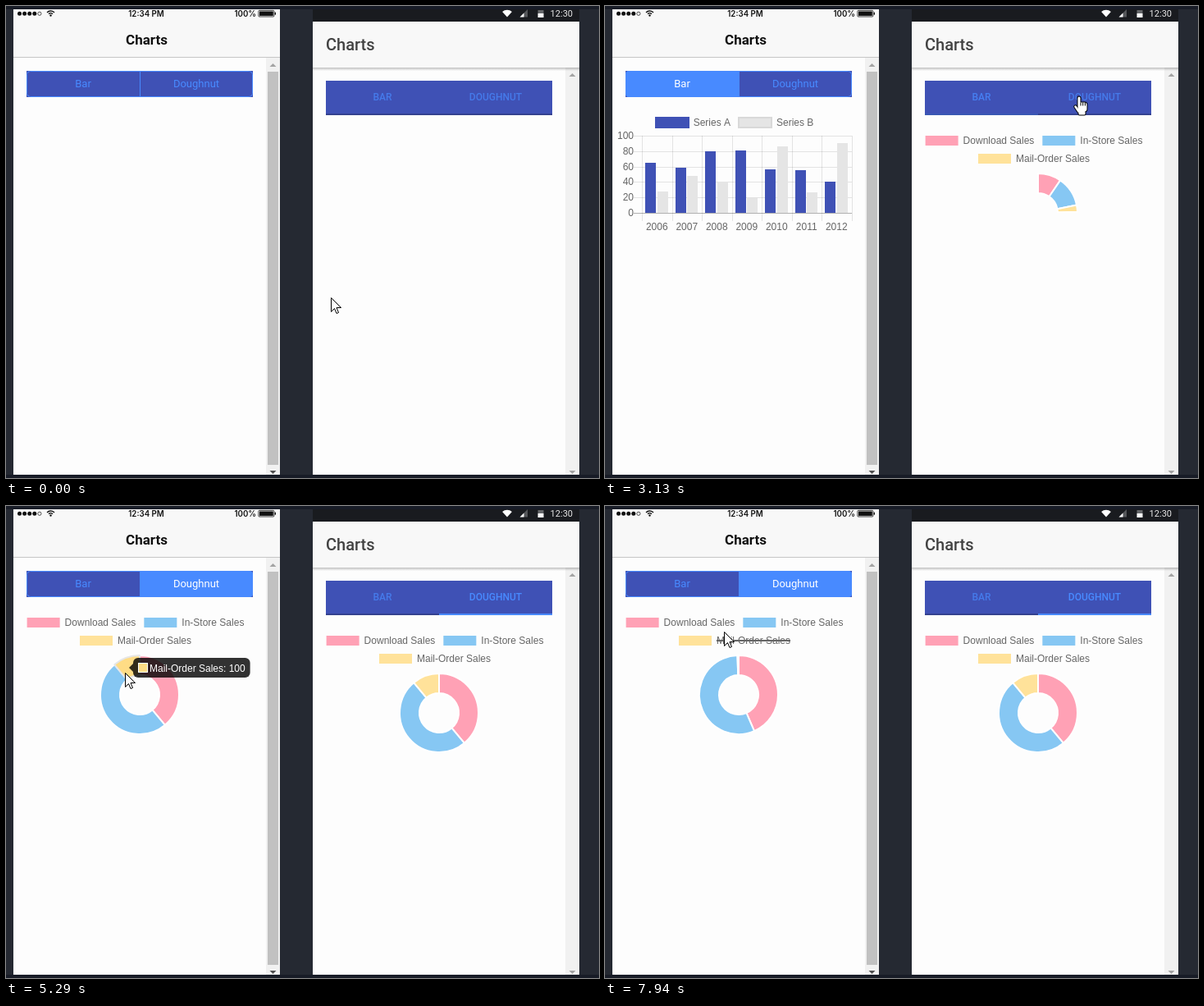
Recreate the animation shown at these times as an HTML page with a canvas. Size 723x575 px, loop 8 s.

```html
<!DOCTYPE html>
<html lang="en">
<head>
<meta charset="utf-8">
<title>Charts</title>
<style>
  html, body { margin: 0; width: 100%; height: 100%; overflow: hidden; background: #252932; }
  canvas { display: block; }
</style>
</head>
<body>
<canvas id="stage" width="723" height="575"></canvas>
<script>
const ctx = document.getElementById('stage').getContext('2d');
const LOOP = 8000;
const NAVY = '#3f51b5', BLUE = '#488aff', GREY = '#666', SILVER = '#e5e5e5';
const ARIAL = '12px "Liberation Sans", Arial, sans-serif';
const roboto = (size, weight = 400) => `${weight} ${size}px Roboto, sans-serif`;

const SERIES = [
  { name: 'Series A', color: NAVY, edge: NAVY, data: [65, 59, 80, 81, 56, 55, 40] },
  { name: 'Series B', color: SILVER, edge: '#d9d9d9', data: [28, 48, 40, 19, 86, 27, 90] }
];
const SLICES = [
  { name: 'Download Sales', value: 350, color: '#ffa1b5', hover: '#ff8ca4' },
  { name: 'In-Store Sales', value: 450, color: '#86c7f3', hover: '#69c3ff' },
  { name: 'Mail-Order Sales', value: 100, color: '#ffe29a', hover: '#ffdc85' }
];
const RING = { x: 163, y: 230, outer: 48, inner: 24 };

// Each phone: chart offset, segment control, and click times
const IOS = { dx: 0, dy: 0, segment: { x: 25, y: 79, h: 32 }, bar: 1060, doughnut: 4060, hide: 7470 };
const MD = { dx: 365, dy: 22, segment: { x: 390, y: 91, h: 42 }, bar: 2210, doughnut: 3130, hide: Infinity };
const SEGMENT_WIDTH = 276;
const LEAD = 67;    // a chart is already this far along when it first shows

// Pointer moves: [start, end, x, y]
const ORIGIN = [396, 355];
const MOVES = [
  [70, 750, 126, 90],
  [1240, 1840, 541, 112], [1870, 2060, 472, 109], [2560, 2960, 577, 109],
  [3200, 3980, 235, 95],
  [4440, 4790, 200, 203], [4790, 5210, 145, 203], [5300, 5560, 129, 215],
  [5960, 6330, 136, 98], [6340, 6640, 151, 215], [6700, 7200, 110, 160],
  [7440, 7930, 145, 153]
];

const clamp = v => Math.max(0, Math.min(1, v));
const mix = (a, b, p) => a + (b - a) * p;
const smooth = p => p * p * (3 - 2 * p);
const easeOutQuart = p => 1 - (1 - clamp(p)) ** 4;
const rad = deg => (deg - 90) * Math.PI / 180;

function rect(color, x, y, w, h) {
  ctx.fillStyle = color;
  ctx.fillRect(x, y, w, h);
}

function frame(color, width, x, y, w, h, radius = 0) {
  ctx.strokeStyle = color;
  ctx.lineWidth = width;
  ctx.beginPath();
  ctx.roundRect(x, y, w, h, radius);
  ctx.stroke();
}

function text(str, x, y, font, color, align = 'left') {
  ctx.font = font;
  ctx.fillStyle = color;
  ctx.textAlign = align;
  ctx.fillText(str, x, y);
}

function polygon(points, fill) {
  ctx.beginPath();
  points.forEach(([x, y]) => ctx.lineTo(x, y));
  ctx.closePath();
  ctx.fillStyle = fill;
  ctx.fill();
}

function disc(x, y, r, fill) {
  ctx.beginPath();
  ctx.arc(x, y, r, 0, 7);
  ctx.fillStyle = fill;
  ctx.fill();
}

function scrollArrow(x, y, dir, color) {
  polygon([[x - 4, y + 2 * dir], [x + 4, y + 2 * dir], [x, y - 2 * dir]], color);
}

function drawIosStatus() {
  const ink = '#111', font = '600 9.7px Inter, sans-serif';
  for (let i = 0; i < 4; i++) disc(16.5 + i * 6.1, 9.3, 2.5, ink);
  frame(ink, .7, 38.8, 7.2, 4.2, 4.2, 2.1);
  ctx.lineWidth = 1.3;
  for (const r of [3.3, 6]) {
    ctx.beginPath();
    ctx.arc(54.5, 12, r, rad(-48), rad(48));
    ctx.stroke();
  }
  disc(54.5, 11.5, 1.2, ink);
  text('12:34 PM', 171, 12.5, font, ink, 'center');
  text('100%', 305, 12.5, font, ink, 'right');
  frame(ink, .8, 307.9, 5.4, 19, 7.6, 1);
  rect(ink, 309, 6.5, 16.8, 5.4);
  rect(ink, 327.6, 7.7, 1.4, 3);
}

function drawIosShell(t) {
  rect('#fdfdfd', 9, 4, 325, 567);
  rect('#f8f8f8', 9, 4, 325, 58);
  rect('#c6c6c6', 9, 62, 325, 1);
  drawIosStatus();
  text('Charts', 171.5, 47, roboto(17, 600), '#111', 'center');

  rect('#f1f1f1', 317, 63, 17, 508);
  rect('#c1c1c1', 319, 80, 13, 479);
  scrollArrow(325.5, 72, 1, '#a3a3a3');
  scrollArrow(325.5, 568, -1, '#505050');

  const { x, y, h } = IOS.segment, half = SEGMENT_WIDTH / 2;
  const active = t >= IOS.doughnut ? 1 : t >= IOS.bar ? 0 : -1;
  rect(NAVY, x, y, SEGMENT_WIDTH, h);
  if (active >= 0) {
    ctx.fillStyle = BLUE;
    ctx.beginPath();
    ctx.roundRect(x + active * half, y, half + 1 - active, h, active ? [0, 4, 4, 0] : [4, 0, 0, 4]);
    ctx.fill();
  }
  frame(BLUE, 1, x + .5, y + .5, SEGMENT_WIDTH - 1, h - 1, 4);
  rect(BLUE, x + half, y, 1, h);
  ['Bar', 'Doughnut'].forEach((label, i) =>
    text(label, x + half * (i + .5), y + 20, roboto(13), i === active ? '#fff' : BLUE, 'center'));
}

function drawMdStatus() {
  rect('#191b1f', 374, 4, 325, 15);
  ctx.fillStyle = '#fff';
  ctx.beginPath();
  ctx.moveTo(611, 13.6);
  ctx.arc(611, 13.6, 8.8, rad(-42), rad(42));
  ctx.fill();
  [[9.5, '#55575a'], [5, '#fff']].forEach(([size, color]) =>
    polygon([[626.5 + size, 13.5 - size], [626.5 + size, 13.5], [626.5, 13.5]], color));
  rect('#66686b', 648.5, 5, 7, 4);
  rect('#fff', 648.5, 9, 7, 5);
  text('12:30', 691, 13, roboto(11), '#e8e8e8', 'right');
}

function drawMdShell(t) {
  rect('#fdfdfd', 374, 4, 325, 567);
  rect('#f1f1f1', 682, 75, 17, 496);
  scrollArrow(690.5, 84, 1, '#a3a3a3');
  scrollArrow(690.5, 568, -1, '#a3a3a3');
  drawMdStatus();
  rect('#f8f8f8', 374, 19, 325, 56);
  const shadow = ctx.createLinearGradient(0, 75, 0, 79);
  shadow.addColorStop(0, 'rgba(0,0,0,.24)');
  shadow.addColorStop(1, 'rgba(0,0,0,0)');
  rect(shadow, 374, 75, 325, 4);
  text('Charts', 390, 54, roboto(20, 500), '#424242');

  const { x, y, h } = MD.segment, half = SEGMENT_WIDTH / 2;
  const fade = start => clamp((t - start) / 100);
  const activity = [fade(MD.bar) * (1 - fade(MD.doughnut - LEAD)), fade(MD.doughnut)];
  rect(NAVY, x, y, SEGMENT_WIDTH, h);
  ['BAR', 'DOUGHNUT'].forEach((label, i) => {
    const left = x + half * i;
    rect('#34418f', left, y + h - 2, half, 2);
    ctx.globalAlpha = activity[i];
    rect(BLUE, left, y + h - 2, half, 2);
    ctx.globalAlpha = mix(.72, 1, activity[i]);
    text(label, left + half / 2, y + 24, roboto(12, 500), BLUE, 'center');
    ctx.globalAlpha = 1;
  });
}

// A centred legend row; each item is a swatch, its name and a gap
function drawLegend(items, y, struck) {
  ctx.font = ARIAL;
  const widths = items.map(item => ctx.measureText(item.name).width);
  let x = RING.x - widths.reduce((sum, w) => sum + w + 56, 0) / 2;
  items.forEach((item, i) => {
    rect(item.color, x, y, 40, 12);
    if (item.edge) frame(item.edge, 2, Math.round(x), y, 40, 12);
    text(item.name, x + 46, y + 10, ARIAL, GREY);
    if (struck) rect(GREY, x + 46, y + 5, widths[i], 2);
    x += widths[i] + 56;
  });
}

function drawBars(progress) {
  const left = 45, right = 301, base = 252, height = 94;
  const step = 36.5, slot = step * .4, grid = 'rgba(0,0,0,.1)';
  drawLegend(SERIES, 136);

  for (let v = 0; v <= 100; v += 20) {
    const y = Math.round(base - v / 100 * height);
    rect(v ? grid : 'rgba(0,0,0,.3)', 35, y, right - 35, 1);
    text(v, 35, y + 4, ARIAL, GREY, 'right');
  }
  for (let i = 0; i <= 7; i++) rect(grid, Math.round(left + i * step), 158, 1, 104);

  for (let i = 0; i < 7; i++) {
    const x = left + i * step;
    SERIES.forEach(({ color, data }, k) => {
      const top = Math.round(base - data[i] / 100 * height * progress);
      rect(color, Math.round(x + step * .1 + slot * (k + .05)), top, 13, base - top);
    });
    text(2006 + i, x + step / 2, 273, ARIAL, GREY, 'center');
  }
}

// Slice boundaries in degrees, clockwise from the top
function boundaries(values) {
  const total = values.reduce((a, b) => a + b);
  let sum = 0;
  return [0, ...values.map(v => (sum += v) / total * 360)];
}
const VALUES = SLICES.map(s => s.value);
const FULL = boundaries(VALUES);
const REDUCED = boundaries([...VALUES.slice(0, 2), 0]);

function drawSlice(from, to, color, edge) {
  ctx.beginPath();
  ctx.arc(RING.x, RING.y, RING.outer, rad(from), rad(to));
  ctx.arc(RING.x, RING.y, RING.inner, rad(to), rad(from), true);
  ctx.closePath();
  ctx.fillStyle = color;
  ctx.strokeStyle = edge;
  ctx.lineWidth = 2;
  ctx.lineJoin = 'bevel';
  ctx.fill();
  ctx.stroke();
}

function drawDoughnut(progress, hidden, hideProgress, hovered) {
  drawLegend(SLICES.slice(0, 2), 136);
  drawLegend(SLICES.slice(2), 158, hidden);
  const angles = FULL.map((a, i) => mix(a, REDUCED[i], hideProgress) * progress);
  SLICES.forEach((s, i) => {
    const lit = i === hovered;
    if (angles[i + 1] - angles[i] > .05)
      drawSlice(angles[i], angles[i + 1], lit ? s.hover : s.color, lit ? '#e6e6e6' : '#fff');
  });
}

function pointerAt(t) {
  let [x, y] = ORIGIN;
  for (const [start, end, toX, toY] of MOVES) {
    const p = smooth(clamp((t - start) / (end - start)));
    x = mix(x, toX, p);
    y = mix(y, toY, p);
  }
  return [x, y];
}

function sliceUnder([px, py]) {
  const x = px - RING.x, y = py - RING.y, r = Math.hypot(x, y);
  if (r < RING.inner || r > RING.outer) return -1;
  const angle = (Math.atan2(x, -y) * 180 / Math.PI + 360) % 360;
  return FULL.findIndex(a => a > angle) - 1;
}

// Moments at which the slice under the pointer changes
const HOVERS = [];
for (let t = IOS.doughnut, last = -1; t < LOOP; t += 5) {
  const slice = sliceUnder(pointerAt(t));
  if (slice !== last) HOVERS.push({ start: t, slice });
  last = slice;
}

const tooltipLabel = s => `${s.name}: ${s.value}`;

function tooltipBox(i) {
  ctx.font = ARIAL;
  const w = ctx.measureText(tooltipLabel(SLICES[i])).width + 26;
  const mid = rad((FULL[i] + FULL[i + 1]) / 2), r = (RING.outer + RING.inner) / 2;
  const x = RING.x + r * Math.cos(mid), y = RING.y + r * Math.sin(mid);
  return { x: i ? x + 7 : x - 7 - w, y: y - 12, w, alpha: 1 };
}

function tooltipAt(t) {
  let box = null, shown = -1, hovered = -1;
  HOVERS.forEach(({ start, slice }, i) => {
    if (t < start) return;
    const end = Math.min(t, HOVERS[i + 1]?.start ?? LOOP);
    const p = easeOutQuart((end - start) / 400);
    hovered = slice;
    if (slice >= 0) shown = slice;
    const goal = slice < 0 ? { ...box, alpha: 0 } : tooltipBox(slice);
    const from = box || { ...goal, alpha: 0 };
    box = {};
    for (const key in goal) box[key] = mix(from[key], goal[key], p);
  });
  return { ...box, shown, hovered };
}

function drawTooltip({ x, y, w, alpha, shown }) {
  if (shown < 0 || alpha < .01) return;
  x = Math.round(x);
  y = Math.round(y);
  const s = SLICES[shown], side = shown ? x : x + w, tip = side + (shown ? -5 : 5);
  ctx.globalAlpha = alpha * .8;
  ctx.fillStyle = '#000';
  ctx.beginPath();
  ctx.roundRect(x, y, w, 24, 6);
  ctx.fill();
  polygon([[side, y + 7], [tip, y + 12], [side, y + 17]], '#000');
  ctx.globalAlpha = alpha;
  rect('#fff', x + 6, y + 6, 12, 12);
  rect(s.hover, x + 7, y + 7, 10, 10);
  text(tooltipLabel(s), x + 20, y + 17, ARIAL, '#fff');
  ctx.globalAlpha = 1;
}

function drawChart(phone, t) {
  const progress = start => easeOutQuart((t - start + LEAD) / 1000);
  ctx.save();
  ctx.translate(phone.dx, phone.dy);
  if (t >= phone.doughnut) {
    const tip = phone === IOS ? tooltipAt(t) : { shown: -1, hovered: -1 };
    const hidden = t >= phone.hide;
    drawDoughnut(progress(phone.doughnut), hidden, hidden ? progress(phone.hide) : 0, tip.hovered);
    drawTooltip(tip);
  } else if (t >= phone.bar) {
    drawBars(progress(phone.bar));
  }
  ctx.restore();
}

function drawArrow() {
  const edge = [[0, 0], [0, 17], [4, 13], [6.5, 19], [9, 18], [6.5, 12], [12, 12]];
  polygon(edge, '#fff');
  ctx.strokeStyle = '#000';
  ctx.lineWidth = 1;
  ctx.stroke();
}

function drawHand() {
  const shape = new Path2D();
  shape.roundRect(-1, 1, 3, 14, 1.5);
  shape.roundRect(-1, 8, 11, 11, 3);
  shape.roundRect(0, 16, 8, 7, 1);
  polygon([[-5, 12], [-2, 12], [1, 20], [-1, 20]], '#000');
  const thumb = new Path2D('M-4 13L0 19');
  ctx.lineCap = 'round';
  for (const [color, edge, width] of [['#000', 2, 4.5], ['#fff', 0, 2.5]]) {
    ctx.strokeStyle = ctx.fillStyle = color;
    ctx.lineWidth = width;
    ctx.stroke(thumb);
    ctx.lineWidth = edge || .01;
    ctx.stroke(shape);
    ctx.fill(shape);
  }
  for (let i = 0; i < 3; i++) rect('#000', 2 + i * 2.7, 8, 1, 4);
}

function drawPointer(t) {
  const [x, y] = pointerAt(t).map(Math.round);
  const over = ({ segment: s }) => x >= s.x && x <= s.x + SEGMENT_WIDTH && y >= s.y && y <= s.y + s.h;
  ctx.save();
  ctx.translate(x + .5, y + .5);
  ctx.lineJoin = 'round';
  if (over(IOS) || over(MD)) drawHand();
  else drawArrow();
  ctx.restore();
}

function draw(t) {
  rect('#252932', 0, 0, 723, 575);
  rect('#181c27', 0, 0, 723, 4);
  rect('#181c27', 0, 571, 723, 4);
  drawIosShell(t);
  drawMdShell(t);
  drawChart(IOS, t);
  drawChart(MD, t);
  drawPointer(t);
}

const begin = performance.now();
function tick() {
  draw((performance.now() - begin) % LOOP);
  requestAnimationFrame(tick);
}
tick();
</script>
</body>
</html>
```
